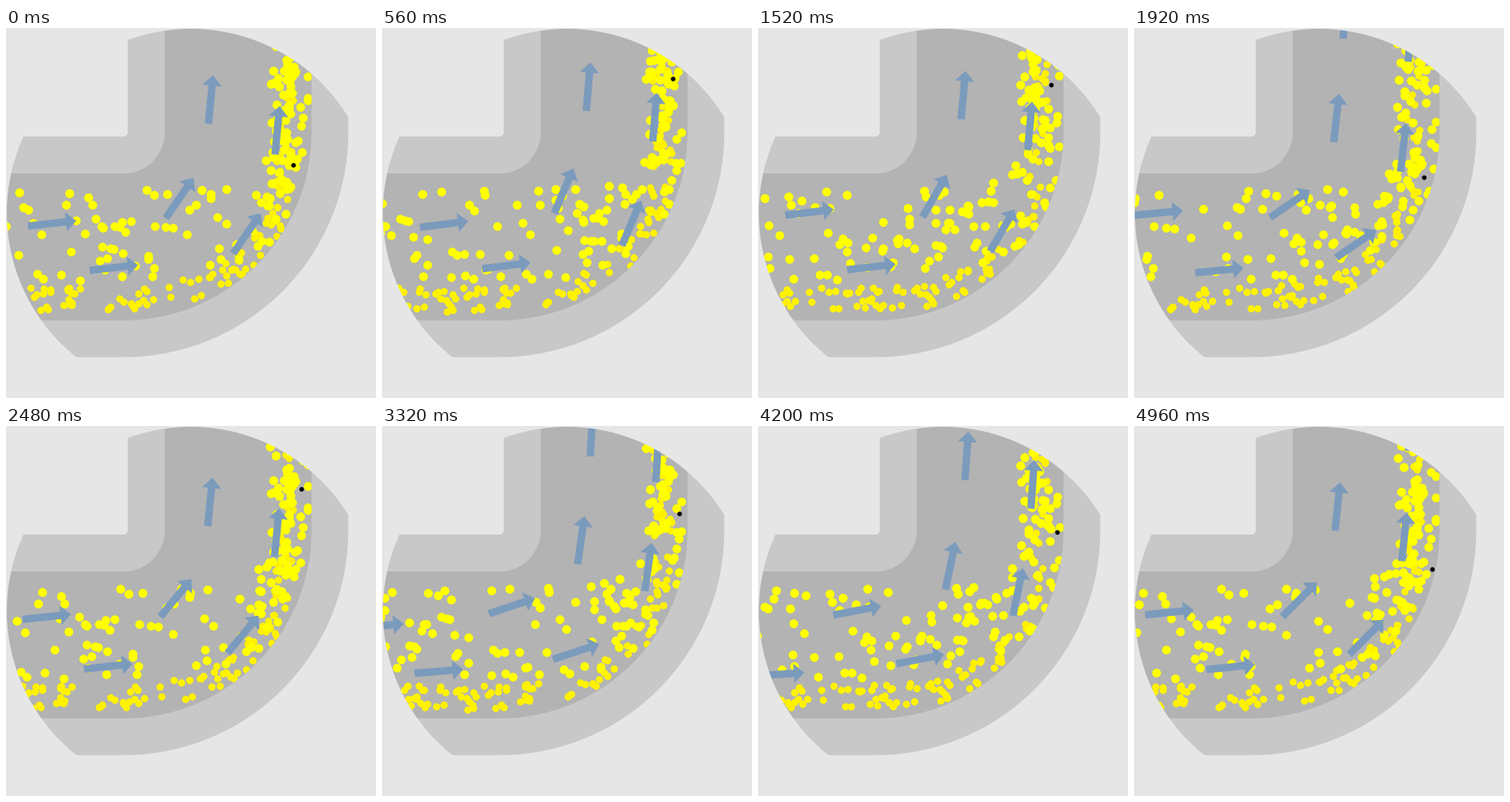
Recreate the animation shown at these times as a matplotlib script. Size 450x450 px, loop 5000 ms.

```python
import numpy as np
import matplotlib.pyplot as plt
from matplotlib.animation import FuncAnimation
from matplotlib.patches import Circle, PathPatch, Polygon
from matplotlib.path import Path

SIZE, DPI = 450, 100
FRAMES, STEP = 125, 40
CYCLE = 64            # frames until the grain pattern repeats
ARROW_CYCLE = 12.5    # frames between two arrows
EXIT_SPEED = 7.0      # px per frame along the right bank

BACK, BANK, BED = "#e6e6e6", "#c8c8c8", "#b3b3b3"
YELLOW, SAND, BLUE = "#ffff00", "#fff200", "#7b9bbd"

fig = plt.figure(figsize=(SIZE / DPI, SIZE / DPI), dpi=DPI, facecolor=BACK)
ax = fig.add_axes([0, 0, 1, 1])
ax.set(xlim=(0, SIZE), ylim=(SIZE, 0))
ax.axis("off")


def arc(cx, cy, r, start, end):
    a = np.radians(np.linspace(start, end, 181))
    return np.column_stack([cx + r * np.cos(a), cy + r * np.sin(a)])


def bend(inner, outer, cx=143, cy=127):
    """Channel coming from the left and turning up, both banks concentric."""
    return Path(np.vstack([
        [(-20, cy + inner)],
        arc(cx, cy, inner, 90, 0),
        [(cx + inner, -20), (cx + outer, -20)],
        arc(cx, cy, outer, 0, 90),
        [(-20, cy + outer)],
    ]))


ax.add_patch(PathPatch(bend(5, 273.3), fc=BANK, ec="none", zorder=1))
bed = PathPatch(bend(50, 228.6), fc=BED, ec="none", zorder=2)
ax.add_patch(bed)

# everything outside the round view is covered
sheet = Path([(-5, -5), (455, -5), (455, 455), (-5, 455), (-5, -5)], closed=True)
view = Path(arc(225, 225, 224, 360, 0), closed=True)
ax.add_patch(PathPatch(Path.make_compound_path(sheet, view), fc=BACK,
                       ec="none", zorder=9))


class Track:
    """One grain's way through the bend, with its speed along it."""

    def __init__(self, y, x_out, x_turn, y_out, speed, rise):
        run = np.linspace((-20, y + rise), (x_turn, y), 40)
        t = np.linspace(0, 1, 60)[1:, None]
        a, b, c = np.array([(x_turn, y), (x_out, y - rise), (x_out, y_out)])
        curve = (1 - t) ** 2 * a + 2 * t * (1 - t) * b + t ** 2 * c
        last = np.linspace((x_out, y_out), (x_out, -15), 21)[1:]
        self.pts = np.vstack([run, curve, last])
        ds = np.hypot(*np.diff(self.pts, axis=0).T)
        s = np.concatenate([[0], np.cumsum(ds)])
        s0, s1 = s[24], s[len(run) + len(curve) - 1]
        mix = np.clip((s - s0) / (s1 - s0), 0, 1)
        v = speed + (EXIT_SPEED - speed) * mix
        self.time = np.concatenate([[0], np.cumsum(ds * 2 / (v[1:] + v[:-1]))])

    def at(self, age):
        return [np.interp(age, self.time, axis, right=-50) for axis in self.pts.T]


rng = np.random.default_rng(12)


def make_layer(count, ys, outs, spread, **shape):
    tracks = []
    for _ in range(count):
        u = rng.random()
        y = ys[0] + u * (ys[1] - ys[0])
        x_out = outs[0] + u * (outs[1] - outs[0]) + rng.uniform(-spread, spread)
        track = Track(y, np.clip(x_out, 319, 367), **shape)
        tracks.append((track, rng.uniform(0, CYCLE)))
    return tracks


def make_dots(radius, color, z):
    dots = ax.scatter([], [], s=(2 * radius * 72 / DPI) ** 2, c=color,
                      linewidths=0, zorder=z)
    dots.set_clip_path(bed)
    return dots


# slow grains on the ground, faster ones above, the quickest near the inner bank
layers = [
    (make_layer(76, (315, 345), (332, 349), 5,
                x_turn=130, y_out=150, speed=4.9, rise=0),
     make_dots(4.4, SAND, 3)),
    (make_layer(98, (231, 307), (328, 365), 9,
                x_turn=172, y_out=135, speed=10, rise=0),
     make_dots(5.3, YELLOW, 4)),
    (make_layer(64, (195, 221), (322, 345), 4,
                x_turn=240, y_out=140, speed=16.7, rise=5),
     make_dots(5.4, YELLOW, 5)),
]

# arrow centres at a few phases of the way
PHASES = np.array([0, 12.5, 20.5, 25, 30, 37.5, 50])
UPPER = np.array([(-110, 234), (56, 232), (158, 219), (211, 207),
                  (234, 170), (249, 87), (257, -36)])
LOWER = np.array([(-44, 308), (131, 291.5), (236, 274.5), (293, 250),
                  (316, 202), (330, 124.5), (336, -10)])
ARROW = np.array([(-29.5, -4.5), (17, -4.5), (17, -11.7), (29.7, 0),
                  (17, 11.7), (17, 4.5), (-29.5, 4.5)])


def along(keys, phase):
    """Smooth Hermite curve through the key points."""
    slope = np.gradient(keys, PHASES, axis=0)
    i = min(np.searchsorted(PHASES, phase, "right") - 1, len(PHASES) - 2)
    h = PHASES[i + 1] - PHASES[i]
    t = (phase - PHASES[i]) / h
    return ((1 + 2 * t) * (1 - t) ** 2 * keys[i]
            + t * (1 - t) ** 2 * h * slope[i]
            + t * t * (3 - 2 * t) * keys[i + 1]
            + t * t * (t - 1) * h * slope[i + 1])


def arrow_shape(keys, phase, sway):
    a = np.pi / 4 + np.arctan((phase - 24) / 2.6) / 2
    turn = np.array([[np.cos(a), -np.sin(a)], [np.sin(a), np.cos(a)]])
    fade = np.clip((18 - phase) / 4, 0, 1)
    return ARROW @ turn + along(keys, phase) + (0, sway * fade)


arrows = []
for keys, sway in ((UPPER, 9), (LOWER, 0)):
    for k in range(4):
        patch = Polygon(ARROW, closed=True, fc=BLUE, ec="none", zorder=6)
        ax.add_patch(patch)
        arrows.append((patch, keys, sway, k * ARROW_CYCLE))

pebble = Circle((0, 0), 2.8, fc="black", ec="none", zorder=7)
ax.add_patch(pebble)


def pebble_place(n):
    """Follows the outer bank, a little closer to it on every pass."""
    y = 227 - 7.5 * ((n + 8) % 25)
    return 352.5 - 21 * ((y - 77) / 150) ** 4 + 0.115 * n, y


def draw(n):
    for tracks, dots in layers:
        dots.set_offsets([
            track.at((n - born) % CYCLE + lap)
            for track, born in tracks for lap in (0, CYCLE)
        ])
    drift = np.cos(2 * np.pi * (n - 80) / 70)
    for patch, keys, sway, lead in arrows:
        patch.set_xy(arrow_shape(keys, n % ARROW_CYCLE + lead, sway * drift))
    pebble.center = pebble_place(n)
    return []


anim = FuncAnimation(fig, draw, frames=FRAMES, interval=STEP,
                     init_func=lambda: draw(0), repeat=True, repeat_delay=0,
                     blit=False)
plt.show()
```
